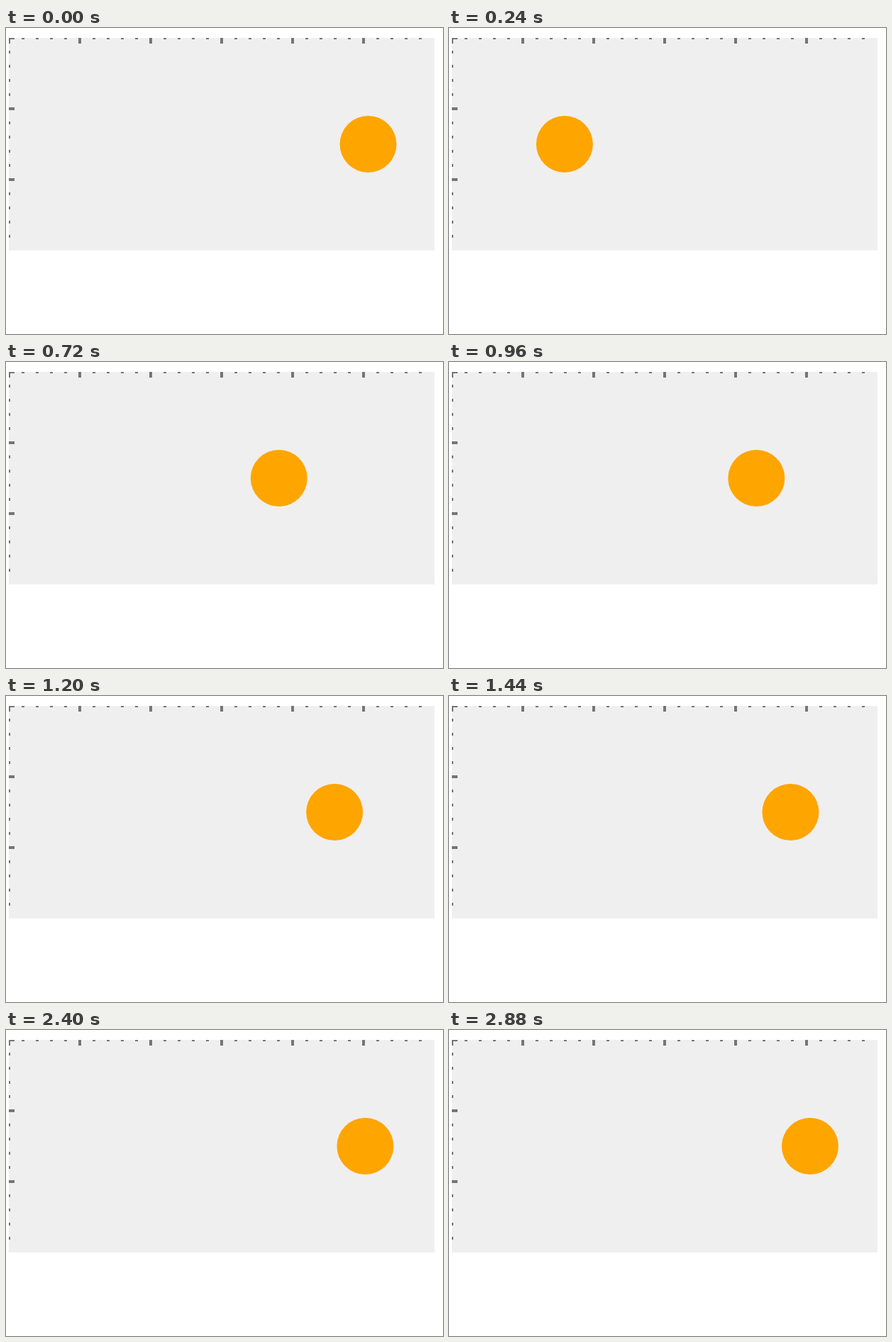
Write an HTML page with a canvas that moves like this. It is 616x432 px and loops after 2940 ms.

```html
<!DOCTYPE html>
<html>
<head>
<meta charset="utf-8">
<style>
html, body { margin: 0; width: 100%; height: 100%; overflow: hidden; background: #fff; }
canvas { display: block; }
</style>
</head>
<body>
<canvas id="stage" width="616" height="432"></canvas>
<script>
const ctx = document.getElementById('stage').getContext('2d');
const LEFT = 4, TOP = 14, WIDTH = 600, HEIGHT = 300;
const LOOP = 2940, STEP = 60, TARGET = 506.5;

// Distance still to travel; it shrinks by a constant ratio per step
function remaining(n) {
  if (n < 2) return 0;
  return 205 * Math.exp((8 - n) * (n < 8 ? 0.132 : 0.1221));
}

function drawRulers() {
  ctx.fillStyle = '#757575';
  for (let p = 0; p < WIDTH; p += 20) {
    const length = p % 100 ? 2 : 8;
    ctx.fillRect(p - 2, 0, 4, length);
    if (p < HEIGHT) ctx.fillRect(0, p - 2, length, 4);
  }
}

function draw(now) {
  const n = Math.floor((now % LOOP) / STEP);
  ctx.clearRect(0, 0, 616, 432);
  ctx.save();
  ctx.translate(LEFT, TOP);
  ctx.beginPath();
  ctx.rect(0, 0, WIDTH, HEIGHT);
  ctx.clip();
  ctx.fillStyle = '#efefef';
  ctx.fillRect(0, 0, WIDTH, HEIGHT);
  drawRulers();
  ctx.fillStyle = '#ffa500';
  ctx.beginPath();
  ctx.arc(TARGET - remaining(n), 150, 40, 0, Math.PI * 2);
  ctx.fill();
  ctx.restore();
}

const start = performance.now();
function tick() {
  draw(performance.now() - start);
  requestAnimationFrame(tick);
}
tick();
</script>
</body>
</html>
```
